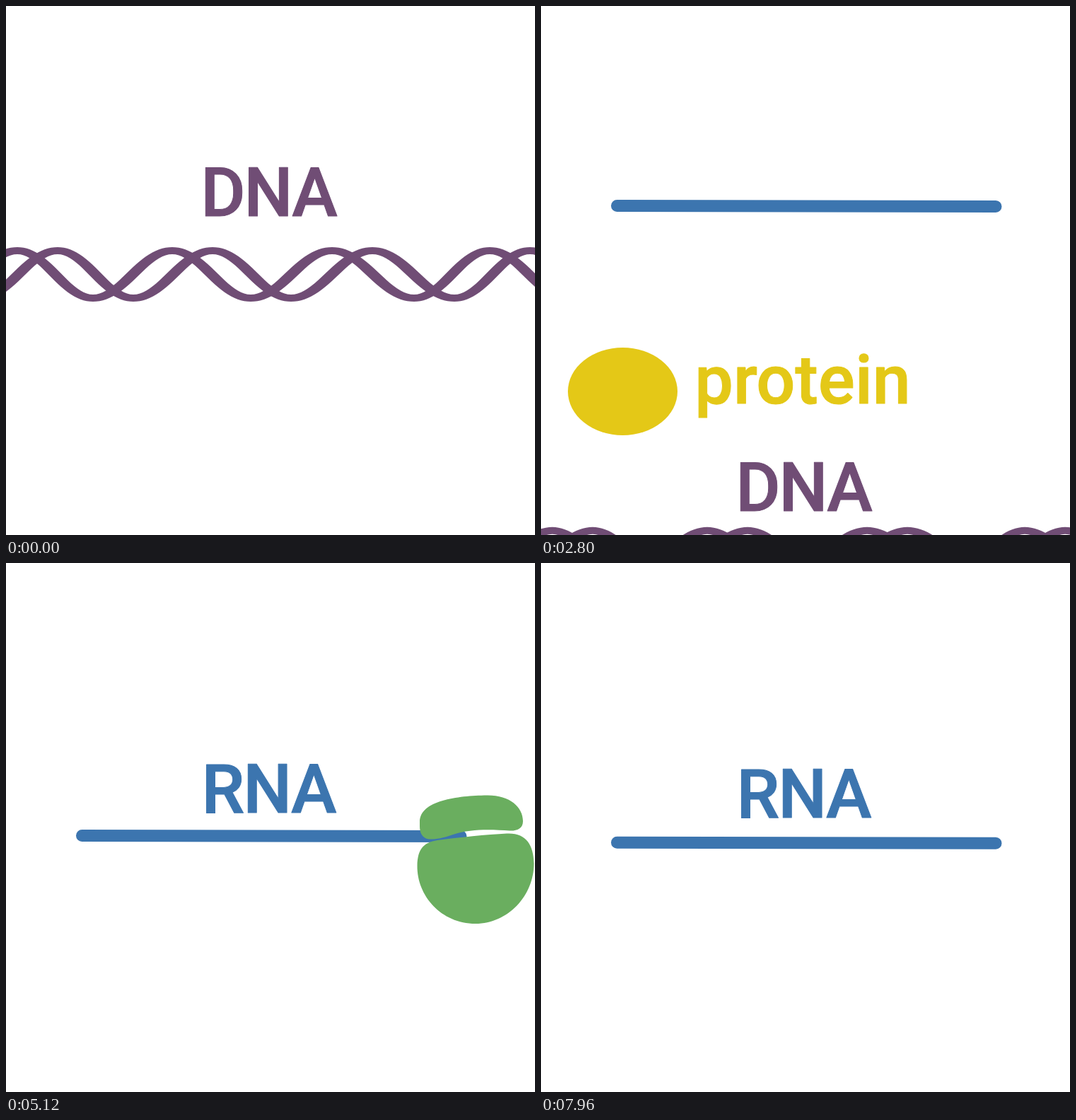
Write an HTML page with a canvas that moves like this. It is 748 px wide and 748 px high and loops after 8 s.

```html
<!DOCTYPE html>
<html lang="en">
<head>
<meta charset="utf-8">
<style>
  html, body { margin: 0; height: 100%; overflow: hidden; background: #fff; }
  canvas { display: block; width: 100vw; height: 100vh; }
</style>
</head>
<body>
<canvas id="stage" width="748" height="748"></canvas>
<script>
const ctx = document.getElementById('stage').getContext('2d');
const PURPLE = '#704d75', BLUE = '#3c75af', YELLOW = '#e4c817', GREEN = '#6aae5f';
const LOOP = 8000, CYCLE = 3120, STEP = 40;

const lerp = (a, b, p) => a + (b - a) * p;
// Eased progress from 0 to 1 between two times
function ease(t, start, end) {
  const u = Math.min(1, Math.max(0, (t - start) / (end - start)));
  return u * u * (3 - 2 * u);
}

function label(text, x, y, color, alpha = 1, spacing = '-2px') {
  if (alpha <= 0) return;
  ctx.globalAlpha = alpha;
  ctx.font = '500 97px Roboto, "Open Sans", sans-serif';
  ctx.letterSpacing = spacing;
  ctx.textAlign = 'center';
  ctx.fillStyle = ctx.strokeStyle = color;
  ctx.lineWidth = 1;
  ctx.lineJoin = 'round';
  ctx.strokeText(text, x, y);
  ctx.fillText(text, x, y);
  ctx.globalAlpha = 1;
}

function ellipse(x, y, rx, ry, angle = 0) {
  ctx.fillStyle = YELLOW;
  ctx.beginPath();
  ctx.ellipse(x, y, rx, ry, angle, 0, 2 * Math.PI);
  ctx.fill();
}

// Rounded thread; c and d are the control points of the curve from a to b
function thread(color, a, c, d, b) {
  ctx.strokeStyle = color;
  ctx.lineWidth = 17;
  ctx.lineCap = 'round';
  ctx.beginPath();
  ctx.moveTo(...a);
  ctx.bezierCurveTo(...c, ...d, ...b);
  ctx.stroke();
}

// Turning points of one strand: crest, trough, crest, ...
const turns = [-206, -95, 16, 123, 235, 346, 461, 577, 684, 795];

function strand(shift, dy) {
  const upper = [], lower = [];
  for (let i = 0; i + 1 < turns.length; i++) {
    for (let k = 0; k < 24; k++) {
      const x = lerp(turns[i], turns[i + 1], k / 24) + shift;
      const phase = Math.PI * (i + k / 24);
      const y = 379.5 + dy - 33.5 * Math.cos(phase);
      const half = 5 + 4.7 * Math.sin(phase) ** 2;
      upper.push([x, y - half]);
      lower.unshift([x, y + half]);
    }
  }
  ctx.fillStyle = PURPLE;
  ctx.beginPath();
  for (const point of upper.concat(lower)) ctx.lineTo(...point);
  ctx.fill();
}

function helix(dy) {
  strand(0, dy);
  strand(57, dy);
}

const ribosomePath = new Path2D(
  'M585 372V366C585 336 638 329 680 328.5C712 328 731 345 731 365' +
  'C731 376 722 379 712 378.5C690 377 658 375 632 384C615 390 606 391 598 390.5C588 389 585 381 585 372Z' +
  'M581.5 428C582 405 590 395 610 392C640 388 680 384 708 382.5' +
  'C735 381 746 398 746.5 425C746.5 470 710 510 664 510C615 510 581 470 581.5 428Z');

function ribosome(dx) {
  ctx.save();
  ctx.translate(dx, 0);
  ctx.fillStyle = GREEN;
  ctx.fill(ribosomePath);
  ctx.restore();
}

function transcription(t) {
  const slide = ease(t, 295, 1140);
  const x = lerp(104.5, 844, slide);
  const y = lerp(lerp(-70, 403, ease(t, 0, 330)), 365, slide);
  label('DNA', 371, 297, PURPLE, 1 - ease(t, 540, 760));
  helix(0);
  if (t > 0) ellipse(x, y, 94.3, 60.8, 0.171);
  if (t >= 400) {
    const drop = ease(t, 440, 830), land = ease(t, 860, 1220);
    const tail = [lerp(136, 107.5, drop), lerp(386, 669, drop)];
    const head = [lerp(Math.min(x - 17, 643), 643, land), lerp(y - 23, 669, land)];
    const dx = head[0] - tail[0], dy = head[1] - tail[1];
    thread(BLUE, tail, [tail[0] + dx * 0.6, tail[1]],
      [head[0] - dx * 0.25, head[1] - dy * 0.5], head);
  }
  label('RNA', 371, 546, BLUE, ease(t, 1140, 1280));
}

function translation(t) {
  const scroll = ease(t, 1400, 1760), leave = ease(t, 2720, 3080);
  const up = -816 * leave;
  if (scroll < 1) helix(-474 * scroll);
  const y = lerp(669, 386, scroll) + up;
  thread(BLUE, [107.5, y - 0.5], [300, y], [450, y], [643, y + 0.5]);
  label('RNA', 371, lerp(546, 353, scroll), BLUE, 1 - ease(t, 2080, 2320));

  const slide = ease(t, 2000, 2520);
  const dx = 170 * (1 - ease(t, 1910, 2000)) - 760 * slide;
  if (t > 1920 && slide < 1) ribosome(dx);

  const fold = ease(t, 2400, 2600);
  if (t > 2080 && fold < 1) {
    const drop = ease(t, 2080, 2400);
    const head = [lerp(Math.max(664 + dx, 115.5), 115.5, fold), lerp(455, 648, fold)];
    const tail = [lerp(lerp(650, 330, drop), 115.5, fold), lerp(470, 648, drop)];
    thread(YELLOW, head, [head[0], lerp(head[1], tail[1], 0.6)],
      [lerp(head[0], tail[0], 0.4), tail[1]], tail);
  }
  if (fold > 0) ellipse(115.5, 648 + up, 77.5 * fold, 62 * fold);
  label('protein', 370, 665 + up, YELLOW, ease(t, 2560, 2680), '0px');

  if (leave > 0) {
    label('DNA', 371, 297 + 477 * (1 - leave), PURPLE);
    helix(453 * (1 - leave));
  }
}

function draw() {
  // The picture advances 25 times a second
  const t = Math.floor(performance.now() / STEP) * STEP % LOOP % CYCLE;
  ctx.fillStyle = '#fff';
  ctx.fillRect(0, 0, 748, 748);
  if (t < 1400) transcription(t);
  else translation(t);
  requestAnimationFrame(draw);
}
draw();
</script>
</body>
</html>
```
